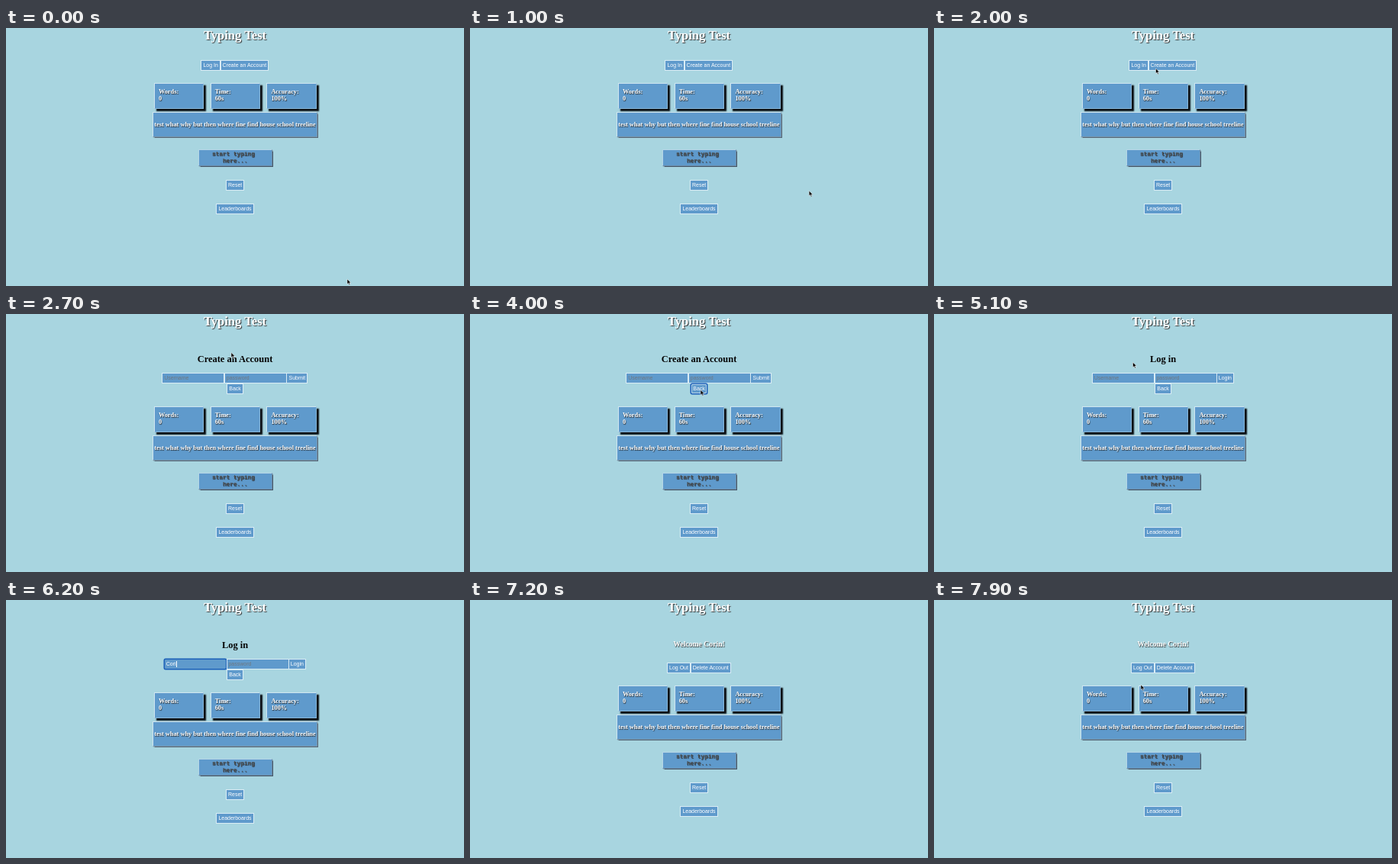
Animation, 600 px wide and 338 px high, one loop 8 s. Source, as an HTML page:

```html
<!DOCTYPE html>
<html lang="en">
<head>
<meta charset="utf-8">
<title>Typing Test</title>
<style>
  html, body { margin: 0; width: 100%; height: 100%; overflow: hidden; background: #a8d5e0; }
  #stage {
    position: relative; width: 600px; height: 338px; overflow: hidden;
    background: #a8d5e0; color: #fff;
    font: bold 8.3px/9.3px "Liberation Serif", serif;
  }
  #stage div, h1, h2, h3, svg { position: absolute; box-sizing: border-box; margin: 0; }
  h1, h2, h3 { left: 0; width: 600px; text-align: center; }
  h1 { top: 1.4px; font-size: 16.6px; line-height: 18px; text-shadow: 1px 1px 1px #333; }
  h2 { top: 52.3px; font-size: 12.45px; line-height: 14px; color: #050505; }
  h3 { top: 51.9px; font-size: 9.7px; line-height: 11px; }
  h3, .stat, .words { text-shadow: .6px .6px 1px #222; }
  .view, #panel { left: 0; top: 0; width: 600px; height: 338px; }
  .btn, .field {
    height: 14px; border: 1px solid #d9ecf5; background: #5f9acc;
    font: 7px/12px "Liberation Sans", sans-serif; white-space: pre;
  }
  .btn { text-align: center; }
  .field { padding-left: 1.8px; width: 82px; }
  .hint { color: #70787f; }
  .focus { border-color: #1b5fb8; border-radius: 2px; box-shadow: 0 0 0 .5px #1b5fb8; }
  .btn.focus { box-shadow: 0 0 0 .5px #1b5fb8, inset 0 0 0 .7px #d9ecf5; }
  .caret { display: inline-block; width: .6px; height: 8px; background: #fff; vertical-align: -1.5px; }
  .stat {
    top: 71.6px; width: 65.5px; height: 34.4px; padding: 6px 0 0 5.2px;
    border: 1px solid #c3deed; border-color: #d0e6f1 #86b4d6 #86b4d6 #d0e6f1;
    background: #5f9acc; box-shadow: 3px 3px 1.5px #0a0f14;
  }
  .words {
    left: 191.7px; top: 109.8px; width: 216.6px; height: 32.8px; line-height: 31px;
    text-align: center; white-space: nowrap; background: #5f9acc;
    border: 1px solid; border-color: #cfe5f0 #7896ab #7896ab #cfe5f0;
    box-shadow: .6px .8px 1px #567;
  }
  .entry {
    left: 251.6px; top: 158.8px; width: 97.2px; height: 21.8px; padding-top: .8px;
    background: #5f9acc; border: 1px solid; border-color: #b5d5e7 #6c8ca8 #6c8ca8 #b5d5e7;
    box-shadow: .8px .8px 1px #456; color: #4b4f52; text-align: center; white-space: pre;
    font: bold 7.78px/9.2px "Liberation Mono", monospace; text-shadow: .6px .6px .8px #2b3035;
  }
  #cursor { left: 0; top: 0; overflow: visible; }
</style>
</head>
<body>
<div id="stage">
  <h1>Typing Test</h1>

  <div class="view" id="home">
    <div class="btn" style="left:255.4px;top:41.6px;width:25.6px">Log In</div>
    <div class="btn" style="left:280.6px;top:41.6px;width:63.6px">Create an Account</div>
  </div>

  <div class="view" id="create">
    <h2>Create an Account</h2>
    <div class="field hint" style="left:204.4px;top:77.3px">Username</div>
    <div class="field hint" style="left:286px;top:77.3px">password</div>
    <div class="btn" style="left:367.4px;top:77.3px;width:28px">Submit</div>
    <div class="btn" id="back" style="left:289px;top:91.2px;width:22px">Back</div>
  </div>

  <div class="view" id="login">
    <h2>Log in</h2>
    <div class="field" id="user" style="left:207px;top:77.3px"></div>
    <div class="field" id="pass" style="left:288.6px;top:77.3px"></div>
    <div class="btn" style="left:369.8px;top:77.3px;width:23.2px">Login</div>
    <div class="btn" style="left:289px;top:91.2px;width:22px">Back</div>
  </div>

  <div class="view" id="welcome">
    <h3>Welcome Corin!</h3>
    <div class="btn" style="left:258px;top:82px;width:31px">Log Out</div>
    <div class="btn" style="left:288.6px;top:82px;width:53.2px">Delete Account</div>
  </div>

  <div id="panel">
    <div class="stat" style="left:193.7px">Words:<br>0</div>
    <div class="stat" style="left:267.5px">Time:<br>60s</div>
    <div class="stat" style="left:341.2px">Accuracy:<br>100%</div>
    <div class="words">test what why but then where fine find house school treeline</div>
    <div class="entry">start typing 
here...</div>
    <div class="btn" style="left:287.8px;top:198.5px;width:24.6px">Reset</div>
    <div class="btn" style="left:275.4px;top:229.5px;width:49.2px">Leaderboards</div>
  </div>

  <svg id="cursor" width="6" height="9">
    <path d="M0 0V6.6L1.6 5.2L2.7 7.8L3.8 7.3L2.7 4.8H4.8Z" fill="#000" stroke="#fff" stroke-width=".5"/>
  </svg>
</div>

<script>
const LOOP = 8000, TICK = 100, NAME = "Corin";
const $ = id => document.getElementById(id);

// [start, view, panel offset]
const views = [
  [0, "home", 0], [2200, "create", 49], [4100, "home", 0],
  [4800, "login", 49], [7200, "welcome", 40]
];

// [time, x, y]
const path = [
  [0, 447, 329], [500, 468, 294], [900, 458, 236], [1500, 375, 100],
  [1800, 329, 54], [2000, 290.5, 53], [2200, 290.5, 53], [2700, 295, 50.5],
  [3100, 295, 50.5], [3800, 302, 99.5], [4100, 302, 99.5], [4600, 269.5, 49.5],
  [4900, 269.5, 49.5], [5400, 247, 84], [7400, 247, 84], [7900, 271, 111]
];

function pointAt(t) {
  const i = path.findIndex(p => p[0] > t);
  if (i < 0) return path[path.length - 1].slice(1);
  const [t0, x0, y0] = path[i - 1], [t1, x1, y1] = path[i];
  const k = (t - t0) / (t1 - t0);
  return [x0 + (x1 - x0) * k, y0 + (y1 - y0) * k];
}

const typed = (t, start) => Math.max(0, Math.floor((t - start) / TICK) + 1);

function setField(id, text, hint, focused) {
  const el = $(id);
  el.className = "field" + (text ? "" : " hint") + (focused ? " focus" : "");
  el.textContent = text || hint;
  if (focused) {
    const caret = document.createElement("span");
    caret.className = "caret";
    text ? el.append(caret) : el.prepend(caret);
  }
}

function render(time) {
  const t = Math.floor(time % LOOP / TICK) * TICK;
  const [, view, offset] = views.filter(v => v[0] <= t).pop();
  for (const id of ["home", "create", "login", "welcome"])
    $(id).style.display = id === view ? "block" : "none";
  $("panel").style.top = offset + "px";
  $("back").classList.toggle("focus", t >= 3900);

  setField("user", NAME.slice(0, typed(t, 5900)), "Username", t >= 5500 && t < 6500);
  setField("pass", "•".repeat(Math.min(5, typed(t, 6600))), "password", t >= 6500);

  const [x, y] = pointAt(t);
  $("cursor").style.transform = `translate(${x}px, ${y}px)`;
  $("cursor").style.visibility = t >= 5800 && t < 7500 ? "hidden" : "visible";
}

let start;
function frame(now) {
  start ??= now;
  render(now - start);
  requestAnimationFrame(frame);
}
render(0);
requestAnimationFrame(frame);
</script>
</body>
</html>
```
